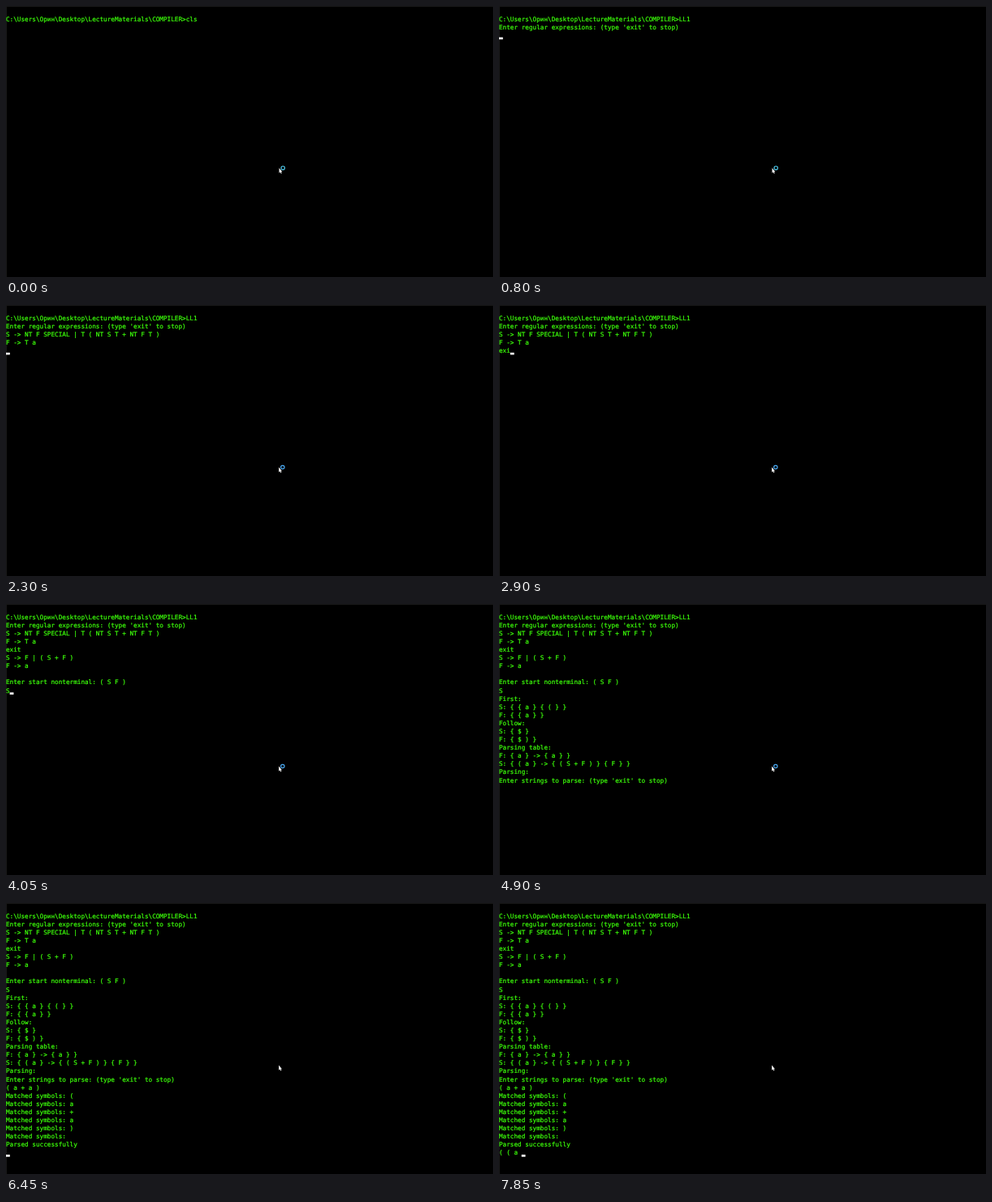
An HTML page that plays this animation: 600x335 px, repeating every 8000 ms.

```html
<!DOCTYPE html>
<html lang="en">
<head>
<meta charset="utf-8">
<title>LL1 parser session</title>
<style>
  html, body { margin: 0; width: 100%; height: 100%; overflow: hidden; background: #000; }
  svg { display: block; width: 600px; height: 335px; }
  text {
    font: 7.68px "DejaVu Sans Mono", "Noto Sans Mono", monospace;
    fill: #3cff0a; stroke: #3cff0a; stroke-width: .22px;
    white-space: pre; text-rendering: geometricPrecision;
  }
</style>
</head>
<body>
<svg viewBox="0 0 600 335">
  <path d="M0 .5H600M.5 0V335" stroke="#181818"/>
  <g id="screen"></g>
  <rect id="caret" width="4.8" height="2.6" fill="#fff"/>
  <g id="pointer">
    <path d="M336.5 200.2V206.4l1.3-1.1 1 1.9 1-.5-.9-1.8h1.5z" fill="#f4f4f4"/>
    <circle id="busy" cx="341.2" cy="200.2" r="2.2" fill="none" stroke-width="1.2"/>
  </g>
</svg>
<script>
const LOOP = 8000, CHAR = 4.626, PITCH = 10.09, BLINK = 600;
const PROMPT = 'C:\\Users\\Орин\\Desktop\\LectureMaterials\\COMPILER>';
const lines = [
  PROMPT + 'LL1',
  "Enter regular expressions: (type 'exit' to stop)",
  'S -> NT F SPECIAL | T ( NT S T + NT F T )',
  'F -> T a',
  'exit',
  'S -> F | ( S + F )',
  'F -> a',
  '',
  'Enter start nonterminal: ( S F )',
  'S',
  'First:',
  'S: { { a } { ( } }',
  'F: { { a } }',
  'Follow:',
  'S: { $ }',
  'F: { $ ) }',
  'Parsing table:',
  'F: { a } -> { a } }',
  'S: { ( a } -> { ( S + F ) } { F } }',
  'Parsing:',
  "Enter strings to parse: (type 'exit' to stop)",
  '( a + a )',
  ...['(', 'a', '+', 'a', ')', ''].map(s => 'Matched symbols: ' + s),
  'Parsed successfully',
  '( ( a '
];

// The caret reaches `row` at time `at`; typing starts at `type`, one key per `gap`.
const phases = [
  { at: 0, row: 1 },
  { at: 750, row: 2 },
  { at: 1750, row: 4, type: 2500, gap: 180 },
  { at: 3150, row: 5 },
  { at: 3300, row: 9, type: 4000, gap: 100 },
  { at: 4150, row: 21, type: 5400, gap: 100 },
  { at: 6450, row: 29, type: 7100, gap: 150 }
];

const el = id => document.getElementById(id);
const [screen, caret, pointer, busy] = ['screen', 'caret', 'pointer', 'busy'].map(el);
const rows = lines.map((_, i) => {
  const row = document.createElementNS('http://www.w3.org/2000/svg', 'text');
  row.setAttribute('x', 0);
  row.setAttribute('y', 18.7 + PITCH * i);
  return screen.appendChild(row);
});

function draw(t) {
  const { at, row, type = Infinity, gap = 1 } = phases.findLast(p => p.at <= t);
  const typing = t >= type;
  const col = typing ? Math.min(lines[row].length, 1 + Math.floor((t - type) / gap)) : 0;
  rows.forEach((node, i) => {
    let text = i < row ? lines[i] : i === row ? lines[i].slice(0, col) : '';
    if (t < 200 && i === 0) text = PROMPT + 'cls';
    if (node.textContent !== text) node.textContent = text;
  });
  caret.setAttribute('x', col * CHAR);
  caret.setAttribute('y', 18.5 + PITCH * row);
  caret.style.display = at > 0 && (typing || t < at + BLINK) ? '' : 'none';

  const moved = t >= 1500;
  pointer.setAttribute('transform', moved ? 'translate(-.4 .3)' : '');
  busy.setAttribute('stroke', moved ? '#4aa8f0' : '#4cc4e4');
  busy.style.display = t < 5000 ? '' : 'none';
}

const start = performance.now();
function tick() {
  draw((performance.now() - start) % LOOP);
  requestAnimationFrame(tick);
}
tick();
</script>
</body>
</html>
```
